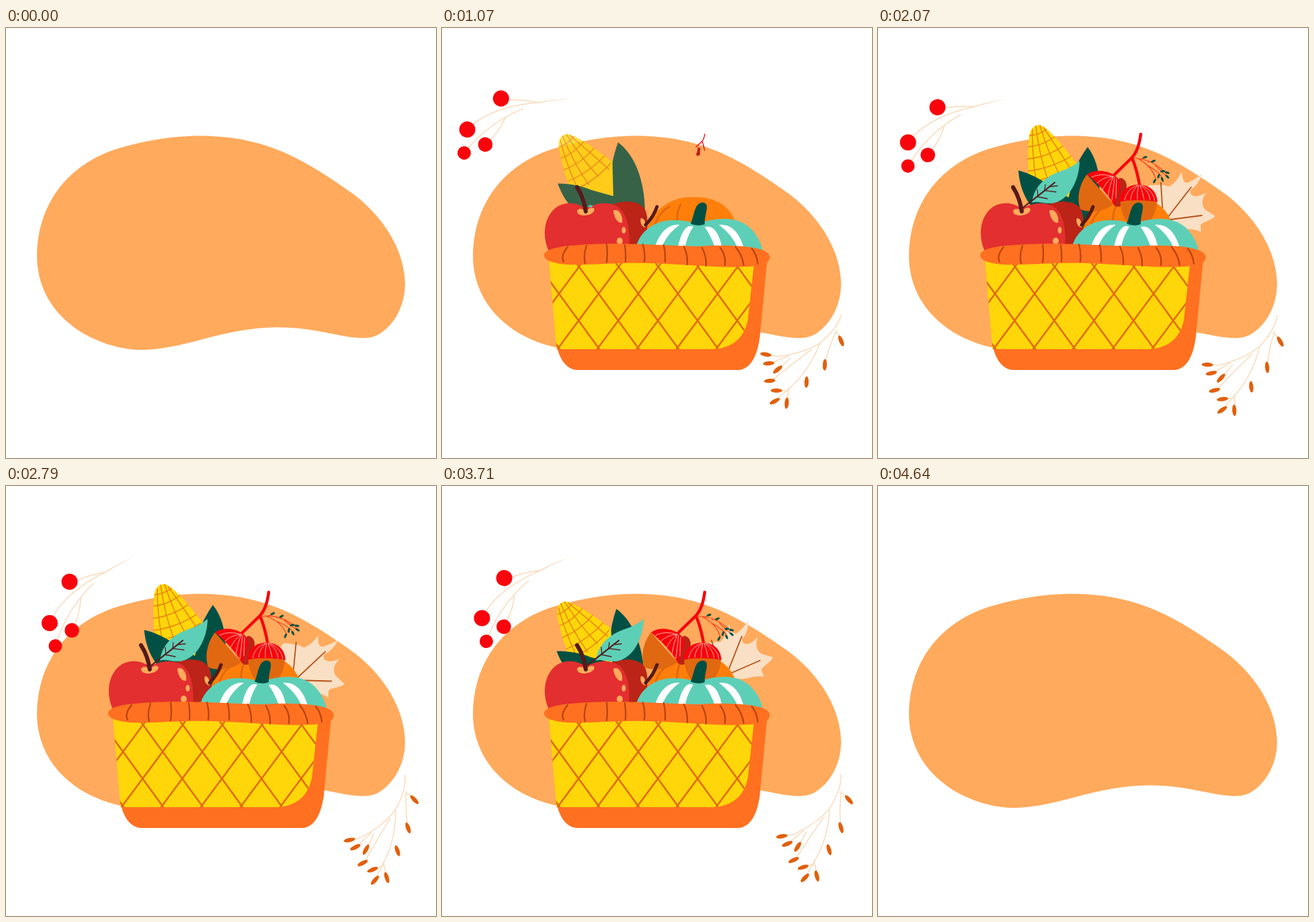
These frames come from a looping animation (640 px wide and 640 px high, 4.71 s). An HTML page:

```html
<!DOCTYPE html>
<html lang="en">
<head>
<meta charset="utf-8">
<title>Harvest basket</title>
<style>
html, body { margin: 0; height: 100%; overflow: hidden; background: #fff }
svg { display: block; width: 100vw; height: 100vh }
.line { fill: none; stroke-linecap: round }
.cream { stroke: #f9dfc3; stroke-width: 1.7 }
.bark { stroke: #551a1a }
.red { fill: #f8040c }
.rust { fill: #e06810 }
.brick { fill: #bb2417 }
.dark { fill: #025043 }
.teal { fill: #5dcfb7 }
.gold { fill: #ffd60a }
.peach { fill: #ffaa5c }
.orange { fill: #ff7020 }
.rib { stroke: #ffb0a0; stroke-width: 1 }
</style>
</head>
<body>
<svg viewBox="0 0 640 640">
<defs><clipPath id="weave"><path d="M159 345L170.500 478H406C440 475 454 452 456 428L465 345Z"/></clipPath></defs>

<path class="peach" d="M46 338C47 262 92 202 168 179C255 153 345 153 420 188C455 204 490 228 518 248C560 280 594 330 594 382C593 420 573 446 553 457C537 465 515 461 490 456C455 449 430 445 401 445.500C365 446 330 453 290 464C255 473 230 479 198 479C160 478 120 461 97 442C64 416 46 380 46 338Z"/>

<g id="berries">
  <path class="line cream" d="M145 121Q85 140 58 173M145 121Q120 122 100 127M125 135Q82 165 58 210M103 152Q98 175 88 190"/>
  <path fill="#f9dfc3" d="M190 105.500Q168 111 145 120L145 122Q170 112 190 105.500Z"/>
  <g class="red"><circle cx="90" cy="127" r="12"/><circle cx="51" cy="183" r="12"/><circle cx="82" cy="199" r="10.800"/><circle cx="54" cy="218" r="10"/></g>
</g>

<g id="seeds">
  <path class="line cream" d="M594 429Q592 452 572 477Q552 497 515 510L503 511M562 489Q535 520 514 547M572 477Q566 520 541 554L527 573M592 453Q586 480 586 500M591 455L600 462M541 552L543 568M534 508L522 526M530 506L508 521M540 557L528 559"/>
  <g id="pods" fill="#e0600c"></g>
</g>

<g id="items">
  <g id="maple">
    <path fill="#f9dfc3" d="M428 290L405 262C396 250 398 238 404 234C415 234 425 232 432 236C440 234 447 224 452 214C453 225 455 232 462 230C470 226 476 222 482 217C480 226 472 238 466 240C462 246 468 252 476 250C484 248 488 244 488 246C480 256 482 268 490 272L502 280C494 288 482 288 480 294L481 304C470 298 460 300 448 298Z"/>
    <path class="line" stroke="#b5521b" stroke-width="1.800" d="M428 286L466 237M428 286L482 279M424 279L421 230"/>
  </g>
  <g id="corn">
    <path class="dark" d="M312 177C330 200 336 240 322 290L290 310C270 260 285 215 312 177Z"/>
    <path class="gold" d="M225 160C228 146 236 143 243 145C255 150 280 180 296 203L283 255L235 260C222 235 222 190 225 160Z"/>
    <path class="line" stroke="#e8780a" stroke-width="1.300" d="M230 151Q229 185 235 225M235 146Q240 190 253 226M241 145Q253 185 270 218M246 148Q268 180 288 212M226 160Q240 159 251 151M224 177Q245 175 263 162M223 195Q252 192 275 176M224 213Q260 208 287 191M228 228Q262 224 293 204"/>
    <path class="dark" d="M209 212C225 216 243 225 255 235L300 262C305 285 290 310 270 300C235 280 212 255 209 212Z"/>
  </g>
  <g id="squash">
    <path fill="#ff7f0a" d="M305 300C315 265 350 250 372 252C410 250 430 268 437 290V340H305Z"/>
    <path class="line" stroke="#e06810" stroke-width="3" d="M338 266Q324 274 318 290M355 263Q349 274 350 290"/>
  </g>
  <g id="twig">
    <path class="line" stroke="#f8040c" stroke-width="4.500" d="M391 158Q388 182 378 193L348 222M378 193Q386 212 390 238"/>
    <path class="brick" d="M360 223C370 224 373 236 367 244C372 255 367 266 357 266C350 266 347 258 350 253C356 246 353 228 360 223Z"/>
  </g>
  <g id="sprig">
    <path class="line" stroke="#f5401c" stroke-width="1.200" d="M380 194Q408 190 432 210M390 194L398 190M402 196L410 195M388 194Q410 202 418 221M404 202Q420 208 428 218M414 200L433 214"/>
    <g id="buds" class="dark"></g>
  </g>
  <g id="acornL">
    <path class="rust" d="M311 218C298 235 296 255 301 270C318 276 340 272 350 262Z"/>
    <path class="red" d="M311 218C325 208 348 212 359 226L361 236L351 263C342 247 327 231 311 218Z"/>
    <path class="line rib" d="M350 221Q332 215 318 222M350 221Q336 221 326 231M350 221Q340 228 334 241M350 221Q344 236 342 251M352 222Q350 244 348 257M355 225L354 253"/>
  </g>
  <g id="acornR">
    <path class="rust" d="M360 256H415C415 272 410 283 400 292H375C366 285 361 272 360 256Z"/>
    <path class="red" d="M359 259C360 240 374 233 389 233C405 234 415 243 416 259C400 256 375 255 359 259Z"/>
    <path class="line rib" d="M386 234Q370 240 367 256M387 234Q377 243 376 255M388 234Q385 244 386 255M390 234Q394 244 396 255M391 234Q404 243 405 256M393 234Q410 242 412 257"/>
  </g>
  <g id="appleB">
    <path class="brick" d="M255 262C275 255 295 258 302 270C308 282 306 300 302 340L262 370Z"/>
    <path class="peach" d="M296 283C302 283 303 290 303 297C297 296 294 289 296 283Z"/>
    <path class="line bark" stroke-width="5" d="M320 266Q315 281 303 293"/>
  </g>
  <g id="appleA">
    <path fill="#e32f2f" d="M158 330C145 300 158 262 188 261C200 260 206 265 215 268C228 262 240 259 252 262C275 268 281 295 278 330C274 365 250 385 215 385C184 385 165 360 158 330Z"/>
    <path class="peach" d="M201 272C205 266 212 270 214 275C217 268 224 265 227 270C226 277 216 279 211 279C206 279 201 277 201 272ZM255 272C262 268 270 278 268 290C262 291 256 283 255 272Z"/>
    <g class="peach"><ellipse cx="270.500" cy="301" rx="3" ry="5"/><ellipse cx="264.500" cy="317" rx="4.500" ry="5"/></g>
    <path class="line bark" stroke-width="6" d="M201 237Q211 252 214 273"/>
  </g>
  <g id="leaf">
    <path class="teal" d="M229 260C232 235 250 220 275 212C287 208 295 202 300 198C300 225 285 258 258 261C246 261 236 257 229 260Z"/>
    <path class="line bark" stroke-width="2.200" d="M215 268Q238 250 263 230"/>
    <path class="line bark" stroke-width="1.300" d="M238 251L237 240M248 242L249 233M249 242L265 244M237 251L252 254M256 236L267 235"/>
  </g>
  <g id="pumpkin">
    <path class="teal" d="M287 345C285 310 310 286 345 286C362 286 372 289 380 293C392 286 412 283 428 284.500C458 287 478 312 480 350C482 390 440 410 383 410C325 410 288 390 287 345Z"/>
    <path fill="#fff" d="M354 293C330 290 314 318 313 352H322C322 330 334 306 354 293ZM374 296C360 288 350 318 348 352H358C360 330 364 310 374 296ZM391 296C400 310 408 325 412 352H420C418 320 410 291 391 296ZM412 293C430 306 444 325 446 352H453C452 325 440 289 412 293Z"/>
    <path class="dark" d="M370 291C376 280 375 258 390 260C399 263 391 275 391 292C384 295 376 294 370 291Z"/>
  </g>
</g>

<g id="basket">
  <path class="orange" d="M159 345L172 478C178 500 190 509 202 509H440C460 509 470 485 473 460L484 345Z"/>
  <g clip-path="url(#weave)">
    <path class="gold" d="M150 340H480V480H150Z"/>
    <path id="lattice" class="line" stroke="#e06c0c" stroke-width="2.600"/>
  </g>
  <path class="orange" d="M152 338C154 326 185 323 245 321C300 321 340 324 380 325C430 322 487 324 488 341C486 352 478 355 440 355.500C400 357 330 348 270 350C235 351 205 353 185 352C165 350 152 346 152 338Z"/>
  <path class="line" stroke="#b5430d" stroke-width="2.200" d="M187 326Q176 339 181 348M215 324Q210 338 213 350M245 322Q247 336 245 349M272 323Q274 336 273 348M299 322Q303 336 301 348M330 323Q333 336 332 348M360 325Q366 338 365 352M387 327Q394 340 393 354M414 327Q423 338 421 353M437 326Q447 338 449 353M461 328Q469 338 470 351"/>
</g>
</svg>
<script>
const LOOP = 4710, STEPS = 66, END = 4638, GROW = 430;
const $ = id => document.getElementById(id);
const clamp = x => Math.max(0, Math.min(1, x));

const ovals = (id, rx, ry, list) => $(id).innerHTML = list.map(([x, y, a]) =>
  `<ellipse rx="${rx}" ry="${ry}" transform="translate(${x} ${y}) rotate(${a})"/>`).join('');
ovals('pods', 8.5, 3.1, [[497, 511, -3], [504, 523, -17], [519, 529, -52], [511, 548, -18], [524, 560, -12],
  [525, 576, -40], [543, 575, 82], [565, 538, 80], [586, 507, 80], [602, 467, 55]]);
ovals('buds', 3.6, 1.6, [[397, 190, -25], [410, 194, -30], [426, 207, -15], [433, 208, 10], [434, 214, 35],
  [427, 219, 60], [421, 215, 100], [416, 223, 110]]);

let d = '';
for (let x = 82; x < 500; x += 59)
  d += `M${x} 350L${x + 94} 479M${x + 126} 350L${x + 30} 479`;
$('lattice').setAttribute('d', d);

// Smooth curve through [time, value] keys
function curve(keys, t) {
  const n = keys.length;
  if (t <= keys[0][0]) return keys[0][1];
  if (t >= keys[n - 1][0]) return keys[n - 1][1];
  const i = keys.findIndex(k => k[0] > t) - 1;
  const slope = j => {
    const a = keys[Math.max(j - 1, 0)], b = keys[Math.min(j + 1, n - 1)];
    return (b[1] - a[1]) / (b[0] - a[0]);
  };
  const [t0, a] = keys[i], [t1, b] = keys[i + 1], h = t1 - t0, u = (t - t0) / h, v = 1 - u;
  return v * v * (1 + 2 * u) * a + u * u * (3 - 2 * u) * b
    + h * u * v * (v * slope(i) - u * slope(i + 1));
}

const swing = [[0, -9], [285, -5], [570, 0], [1140, 14], [1355, 16], [1570, 14.1], [2070, 5.1], [2290, 0],
  [2790, -9.2], [3110, -10.7], [3430, -9], [3710, -5.8], [4000, -0.5], [4640, 12]];
const cornSway = [[850, -18], [1570, -9.7], [2070, 0], [2430, 1.5], [2790, -1.4], [3250, -10], [3710, -16.4],
  [4100, -18.5], [4640, -15]];
const mapleSway = [[1250, -20], [1570, -17.2], [2070, 0], [2500, 8.5], [2790, 8.9], [3250, -3], [3710, -16.2],
  [4200, -20], [4640, -12]];
const sprigSway = [[1500, 16], [2070, 8], [2790, 0], [3250, 2], [3710, 7], [4640, 12]];

const grow = (t, start) => 1 - (1 - clamp((t - start) / GROW)) ** 2;

function pose(id, x, y, scale, angle = 0) {
  $(id).setAttribute('transform',
    `translate(${x} ${y}) rotate(${angle}) scale(${scale}) translate(${-x} ${-y})`);
}

function drop(id, t, start, extra = '') {
  const u = clamp((t - start) / 280);
  $(id).setAttribute('opacity', u);
  $(id).setAttribute('transform', `translate(0 ${-58 * (1 - u)}) ${extra}`);
}

function draw(t) {
  const size = grow(t, 0) * (1 - clamp((t - END + GROW) / GROW) ** 2);
  const sway = curve(swing, t);
  pose('berries', 190, 106, size, sway);
  pose('seeds', 604, 430, size, sway);
  pose('basket', 320, 415, size);

  drop('pumpkin', t, 430);
  drop('squash', t, 640);
  drop('appleA', t, 710);
  drop('appleB', t, 780);
  drop('corn', t, 850, `rotate(${curve(cornSway, t)} 307 362)`);

  pose('twig', 391, 158, grow(t, 1000));
  pose('leaf', 215, 265, grow(t, 1050), 32 * (1 - clamp((t - 1100) / 800)) ** 2);
  pose('maple', 410, 300, grow(t, 1300), curve(mapleSway, t));
  pose('acornR', 389, 234, grow(t, 1277));
  pose('acornL', 350, 221, grow(t, 1398));
  pose('sprig', 380, 194, grow(t, 1550), curve(sprigSway, t));

  const leave = clamp((t - 4180) / 280);
  $('items').setAttribute('opacity', 1 - leave);
  $('items').setAttribute('transform', `translate(0 ${-58 * leave})`);
}

function tick() {
  const step = Math.floor(performance.now() % LOOP / LOOP * STEPS);
  draw(step * LOOP / STEPS);
  requestAnimationFrame(tick);
}
tick();
</script>
</body>
</html>
```
